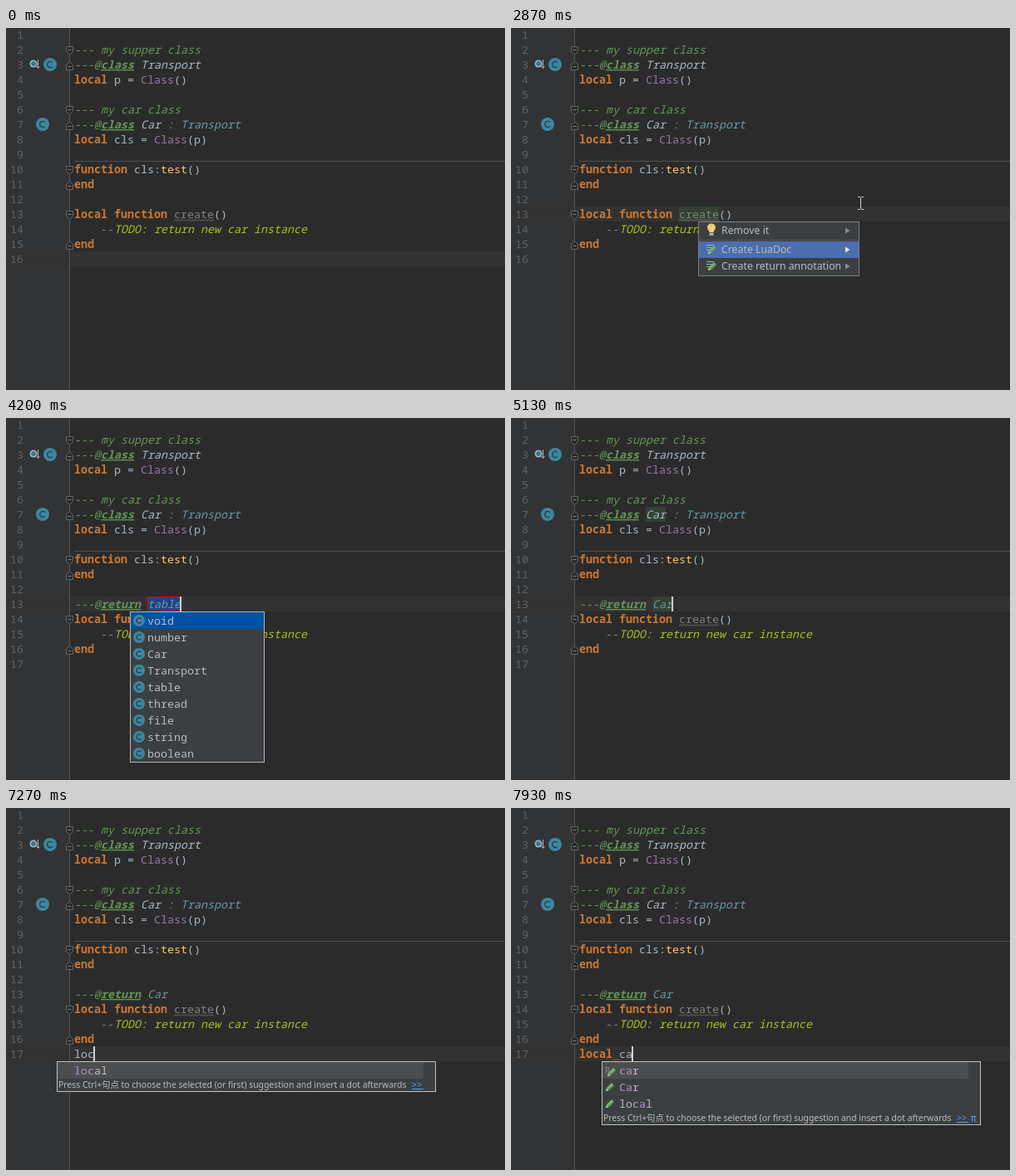
Write an HTML page that moves like this. It is 600x436 px and loops after 8000 ms.

```html
<!DOCTYPE html>
<html lang="en">
<head>
<meta charset="utf-8">
<title>Lua return annotation</title>
<style>
html, body { margin: 0; width: 600px; height: 436px; overflow: hidden; background: #2b2b2b; }
svg { display: block; }
text { white-space: pre; font: 13.333px "Noto Sans Mono", "DejaVu Sans Mono", monospace; fill: #a9b7c6; }
.ui { font: 12.3px "Noto Sans", "Open Sans", sans-serif; fill: #bbb; }
.hint { font: 10.4px "Noto Sans", "Noto Sans CJK SC", "Noto Sans CJK", sans-serif; fill: #bbb; }
.num { fill: #606366; }
.k { fill: #cc7832; font-weight: bold; }
.d { fill: #629755; font-style: italic; }
.t { fill: #629755; font-style: italic; font-weight: bold; text-decoration: underline; }
.n { font-style: italic; }
.s { fill: #6897a8; font-style: italic; }
.m { fill: #9876aa; }
.f { fill: #ffc66d; }
.g { fill: #808080; }
.o { fill: #a8c023; font-style: italic; }
.item { fill: #bbb; }
.link { fill: #589df6; }
</style>
</head>
<body>
<svg id="stage" width="600" height="436" viewBox="0 0 600 436"></svg>
<script>
const LOOP = 8000, STEP = 200 / 3, LEFT = 82, CHAR = 8, ROW = 18;
const stage = document.getElementById('stage');

const HEAD = [
  '', '{d --- my supper class}', '{d ---@}{t class} {n Transport}', '{k local} p = {m Class}()', '',
  '{d --- my car class}', '{d ---@}{t class} {n Car}{d  : }{s Transport}', '{k local} cls = {m Class}(p)', '',
  '{k function} cls:{f test}()', '{k end}', ''
];
const CREATE = ['{k local function} {g create}()', '    {g --}{o TODO: return new car instance}', '{k end}'];

const TYPES = ['void', 'number', 'Car', 'Transport', 'table', 'thread', 'file', 'string', 'boolean'];
const L_WORDS = ['local', 'load', 'loadfile', 'loadstring', 'loadlib', 'collectgarbage', 'select'];
const C_WORDS = ['car', 'Car', 'cls', 'create', 'collectgarbage', 'coroutine', 'local'];

// Each track is a list of [start time, value]; a caret is [line, column, visible].
const CARET = [
  [0, [16]], [930, [13, 18, 1]], [1330, [13, 18]], [1930, [13, 18, 1]], [2130, [13, 18]],
  [3600, [13, 16, 1]], [4270, [13, 12, 1]], [4870, [13, 14, 1]], [5470, [14, 14, 1]],
  [5670, [15, 14, 1]], [5800, [16, 3, 1]], [6000, [17, 0, 1]], [6600, [17, 0]], [7000, [17, 0, 1]]
];
const RETURN_TYPE = [[0, ''], [3600, 'table'], [4270, 'C'], [4870, 'Car']];
const TYPED = [
  [0, ''], [7000, 'l'], [7130, 'lo'], [7200, 'loc'], [7330, 'loca'], [7400, 'local'],
  [7470, '{k local}'], [7530, '{k local} '], [7670, '{k local} c'], [7870, '{k local} ca']
];
const MENU = [[0, -1], [2130, 0], [2870, 1], [3070, 2], [3600, -1]];
const TYPE_LIST = [[0, null], [3670, TYPES], [4330, ['Car']], [4870, null]];
const WORD_LIST = [
  [0, null], [7070, [61, L_WORDS, 'l']], [7200, [61, ['local', 'loadlib'], 'lo']], [7270, [61, ['local'], 'loc']],
  [7400, null], [7800, [109, C_WORDS, 'c']], [7930, [109, ['car', 'Car', 'local'], 'ca']]
];

const at = (track, t) => track.findLast(([start]) => start <= t)[1];
const within = (t, from, to) => t >= from && t < to;
const colX = col => LEFT + col * CHAR;
const rowTop = line => (line - 1) * ROW - 1;

const rect = (x, y, w, h, fill, stroke) =>
  `<rect x="${x}" y="${y}" width="${w}" height="${h}" fill="${fill}"${stroke ? ` stroke="${stroke}"` : ''}/>`;
const path = (d, stroke, fill = 'none', width = 1) =>
  `<path d="${d}" stroke="${stroke}" fill="${fill}" stroke-width="${width}"/>`;
const text = (x, y, str, cls = '') => `<text x="${x}" y="${y}" class="${cls}">${str.replace(/>/g, '&gt;')}</text>`;
const frame = (x, y, w, h, stroke) => rect(x + .5, y + .5, w - 1, h - 1, '#3c3f41', stroke);
const place = (x, y, body) => `<g transform="translate(${x} ${y})">${body}</g>`;

// Inline markup: {class text}
function codeLine(src, line) {
  let col = 0, out = '';
  for (const [all, cls, body] of src.matchAll(/\{(\w) ([^}]*)\}|[^{]+/g)) {
    const str = cls ? body : all;
    out += text(colX(col), line * ROW - 5, str, cls);
    col += str.length;
  }
  return out;
}

function wave(x, y, width, color) {
  let d = `M${x} ${y}`;
  for (let i = 2; i <= width; i += 2) d += `L${x + i} ${y - (i / 2 % 2) * 2}`;
  return path(d, color);
}

const classIcon = (x, y, r) => place(x, y,
  `<circle r="${r}" fill="#3e86a0"/>` +
  path(`M${r * .36} ${-r * .3}A${r * .45} ${r * .45} 0 1 0 ${r * .36} ${r * .3}`, '#233f4b', 'none', 1.3));

const overrideIcon = place(33, 43,
  '<circle r="4.5" fill="#8fb6c8"/><circle r="2.2" fill="#3e86a0" stroke="#2c4d5b"/>' +
  path('M5.5 -5V5M3.5 3L5.5 5.5L7.5 3', '#afb1b3'));

const bulb = (x, y) => place(x, y,
  path('M-2.5 3C-2.5 1 -5 0 -5 -3A5 4.6 0 0 1 5 -3C5 0 2.5 1 2.5 3Z', 'none', '#f2c46d') +
  path('M-1.5 -4L-1 2M1.5 -4L1 2', '#fbe3a8') + rect(-2.5, 3.5, 5, 3.5, '#a8a8a8'));

const pencil = (x, y) => place(x, y,
  path('M-5 5L-4 1L2 -5L5 -2L-1 4Z', 'none', '#62a35a') +
  path('M-3 1.5L3 -4', '#a3cf92') + path('M-5 5L-4.3 2.2L-2.2 4.3Z', 'none', '#d8d8c8'));

const editIcon = (x, y) =>
  place(x, y, path('M-6 -4.5H3M-6 -1.5H1M-6 1.5H-2', '#9fb4c4')) + pencil(x + 1, y + 1);

function foldMark(line, dir) {
  const y = (line - 1) * ROW + 9.5;
  return path(`M72.5 ${y - 5 * dir}H80.5V${y + dir}L76.5 ${y + 5 * dir}L72.5 ${y + dir}Z`, '#656565', '#2b2b2b') +
    path(`M74.5 ${y - dir}H78.5`, '#808080');
}

const highlight = (line, col, length) =>
  rect(colX(col), rowTop(line), length * CHAR, ROW, '#344134');

function mouse(t) {
  if (!within(t, 130, 4200)) return '';
  let x, y;
  if (t < 1070) {
    const u = Math.min(1, Math.floor((t - 130) / STEP + .01) / 9);
    const e = u * u * (3 - 2 * u);
    x = 593 - 365 * e;
    y = 428 - 199 * e;
  } else {
    const u = Math.min(1, (Math.floor((t - 1070) / STEP + .1) + 1) / 5);
    x = 228 + 193 * u;
    y = 229 - 18 * u + 72 * u * (1 - u);
  }
  return place(Math.round(x) - .5, Math.round(y),
    path('M-3.5 -7.5H-1L0 -6.5L1 -7.5H3.5M0 -6.5V6.5M-3.5 7.5H-1L0 6.5L1 7.5H3.5', '#d8d8d8'));
}

function menu(selected) {
  if (selected < 0) return '';
  const rows = [['Remove it', 234], ['Create LuaDoc', 257], ['Create return annotation', 277]];
  return frame(225, 233, 194, 66, '#7c7f80') + path('M226 255.5H418', '#515355') +
    rows.map(([label, y], i) => {
      const on = i === selected;
      return (on ? rect(226, y, 192, 20, '#4b6eaf') : '') +
        (i ? editIcon : bulb)(241, y + 9) + text(253, y + 14, label, 'ui') +
        path(`M402 ${y + 6.5}L407.5 ${y + 10}L402 ${y + 13.5}Z`, 'none', on ? '#e8e8e8' : '#8c8c8c');
    }).join('');
}

function typeList(items) {
  if (!items) return '';
  return frame(149, 233, 162, items.length * 20 + 2, '#b4b4b4') +
    rect(150, 234, 160, 20, '#0052a4') +
    items.map((item, i) => classIcon(160, 244 + i * 20, 7) + text(170, 249 + i * 20, item, 'item')).join('');
}

function wordList(list) {
  if (!list) return '';
  const [x, items, prefix] = list;
  const bottom = 306 + items.length * 20;
  const rows = items.map((item, i) => {
    const y = 321 + i * 20, from = item.toLowerCase().indexOf(prefix), tx = x + 21;
    const icon = prefix[0] === 'l' ? '' :
      (i ? '' : `<text x="${x + 4}" y="${y - 1}" style="font-size:11px" class="g">R</text>`) +
      pencil(x + (i ? 10 : 12), y - (i ? 5 : 3));
    return icon + text(tx, y, item, 'item') +
      text(tx + from * CHAR, y, item.slice(from, from + prefix.length), 'm');
  }).join('');
  const more = x + 427;
  return frame(x, 305, 456, bottom + 16 - 305, '#c0c0c0') + rect(x + 1, 306, 440, 20, '#4b4d4f') + rows +
    text(x + 2, bottom + 11, 'Press Ctrl+句点 to choose the selected (or first) suggestion and insert a dot afterwards', 'hint') +
    text(more, bottom + 11, '>>', 'hint link') + path(`M${more} ${bottom + 12.5}h14`, '#589df6') +
    (prefix[0] === 'c' ? text(x + 443, bottom + 12, 'π', 'link') : '');
}

function draw(t) {
  const returnType = at(RETURN_TYPE, t), typed = at(TYPED, t);
  const [row, col, caretOn] = at(CARET, t);
  const first = returnType ? 14 : 13;
  const doc = returnType ? [`{d ---@}{t return} {s ${returnType}}`] : [];
  const lines = [...HEAD, ...doc, ...CREATE, typed];
  const typedLength = typed.replace(/\{k |\}/g, '').length;
  const caretX = colX(col + (row === 17 ? typedLength : 0)) - 1;

  let out = rect(0, 0, 600, 436, '#2b2b2b') + rect(0, 0, 76, 436, '#313335') +
    rect(0, rowTop(row), 600, ROW, '#323232') +
    path('M76.5 0V436', '#555') + path('M82 160.5H600', '#505050');

  if (within(t, 1200, 5130)) out += highlight(first, 15, 6);
  if (within(t, 5130, 5670)) out += highlight(7, 10, 3) + highlight(13, 11, 3);
  if (within(t, 5470, 5670) || within(t, 5800, 6000)) out += highlight(14, 6, 8) + highlight(16, 0, 3);
  if (within(t, 3600, 4270)) out += rect(170, 215, 40, 18, '#214283');
  if (within(t, 3600, 4870)) out += rect(170.5, 215.5, returnType.length * CHAR - 1, 17, 'none', '#f00000');

  lines.forEach((src, i) => {
    const line = i + 1;
    out += `<text x="21" y="${line * ROW - 5}" text-anchor="end" class="num">${line}</text>` + codeLine(src, line);
  });
  out += wave(202, rowTop(first) + 17.5, 48, '#737373');
  if (t >= 7870) out += wave(122, 304, 8, '#bc3f3c');

  out += [2, 6, 10, first].map(n => foldMark(n, 1)).join('') +
    [3, 7, 11, first + 2].map(n => foldMark(n, -1)).join('') +
    overrideIcon + classIcon(53, 44, 8) + classIcon(44, 116, 8);

  if (caretOn) out += rect(caretX, rowTop(row), 2, ROW, '#d0d0d0');
  if (within(t, 1730, 2130)) out += bulb(96, 207);
  return out + menu(at(MENU, t)) + typeList(at(TYPE_LIST, t)) + wordList(at(WORD_LIST, t)) + mouse(t);
}

let shown = '';
function tick(now) {
  const picture = draw(now % LOOP);
  if (picture !== shown) stage.innerHTML = shown = picture;
  requestAnimationFrame(tick);
}
tick(0);
</script>
</body>
</html>
```
